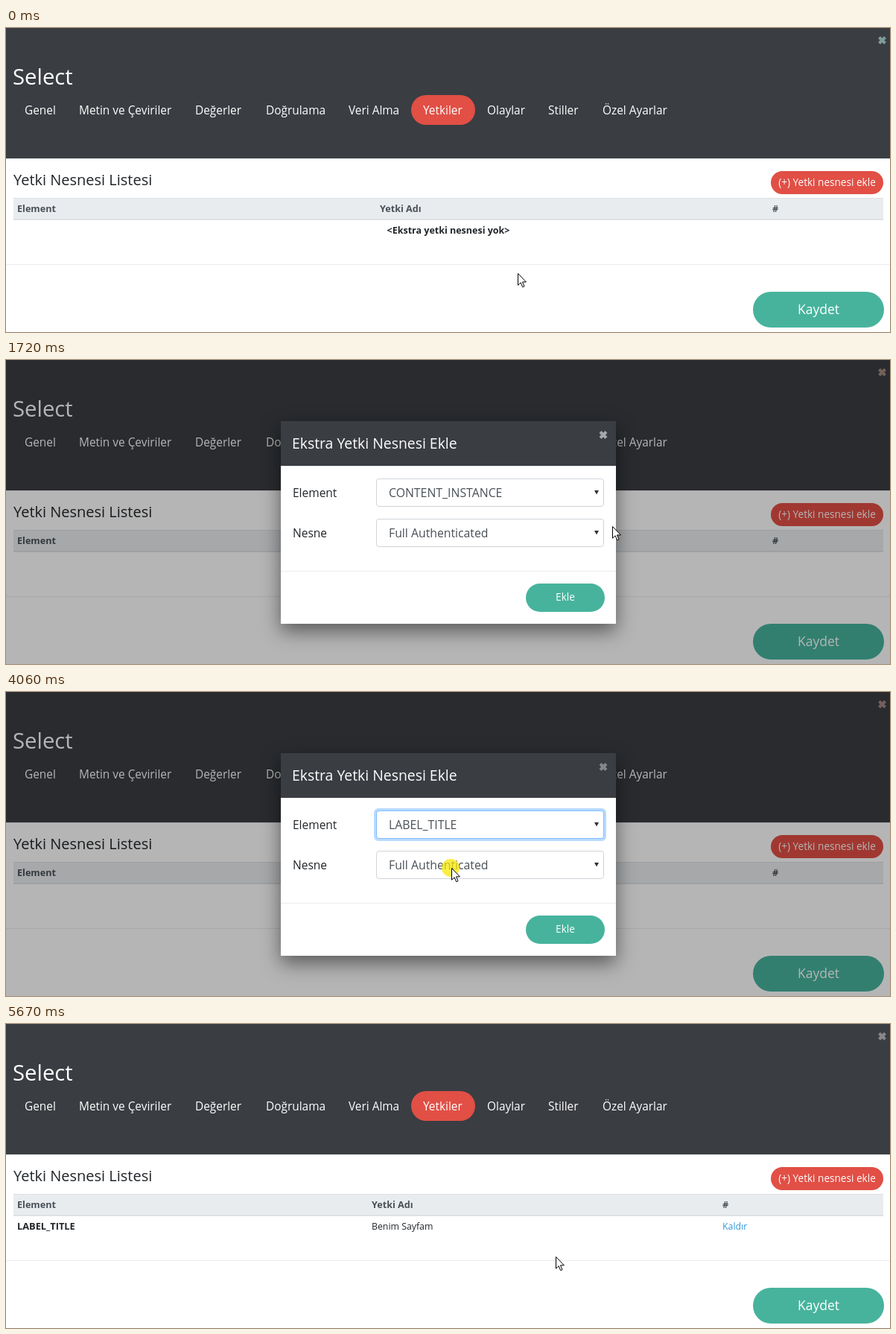
An HTML page that plays this animation: 1187x408 px, repeating every 5800 ms.

```html
<!DOCTYPE html>
<html lang="tr">
<head>
<meta charset="utf-8">
<title>Yetki Nesnesi</title>
<style>
html, body { margin: 0; width: 100%; height: 100%; overflow: hidden; background: #fff; }
svg { display: block; width: 100%; height: 100%; font-family: "Open Sans", "Noto Sans", sans-serif; }
text { white-space: pre; }
#modal { filter: drop-shadow(0 10px 13px rgba(0, 0, 0, .5)); }
</style>
</head>
<body>
<svg id="stage" viewBox="0 0 1187 408" xmlns="http://www.w3.org/2000/svg"></svg>
<script>
const NS = 'http://www.w3.org/2000/svg';
const LOOP = 5800;
const DARK = '#3a3d42', RED = '#e14f45', BLUE = '#375aaf', GREEN = '#47b39d';
const INK = '#212529', GREY = '#495057', LINE = '#e9ecef';

function el(parent, tag, attrs = {}) {
  const node = document.createElementNS(NS, tag);
  for (const k in attrs) node.setAttribute(k, attrs[k]);
  return parent.appendChild(node);
}
const rect = (p, x, y, width, height, fill, more) => el(p, 'rect', { x, y, width, height, fill, ...more });
const group = p => el(p, 'g');
function label(p, str, x, y, size, fill, weight = 400, anchor = 'start') {
  const node = el(p, 'text', { x, y, 'font-size': size, fill, 'font-weight': weight, 'text-anchor': anchor });
  node.textContent = str;
  return node;
}
function cross(p, x, y, stroke) {
  return el(p, 'path', { d: `M${x - 4} ${y - 4}l8 8m0 -8l-8 8`, stroke, 'stroke-width': 4 });
}
function pill(p, x, y, w, h, fill, str, base, size, weight) {
  const body = rect(p, x, y, w, h, fill, { rx: h / 2 });
  label(p, str, x + w / 2, base, size, '#fff', weight, 'middle');
  return body;
}
const show = (node, on) => node.setAttribute('display', on ? 'inline' : 'none');

const stage = document.getElementById('stage');

// Page
rect(stage, 0, 0, 1187, 408, '#fff');
rect(stage, 0, 0, 1187, 175, DARK);
rect(stage, 0, 175, 1187, 1, LINE);
const pageClose = cross(stage, 1176.5, 16.5, '#888');
label(stage, 'Select', 9, 76, 29.3, '#fff');
rect(stage, 544, 90, 86, 40, RED, { rx: 20 });
[['Genel', 25], ['Metin ve Çeviriler', 98], ['Değerler', 254], ['Doğrulama', 349], ['Veri Alma', 460],
 ['Yetkiler', 560], ['Olaylar', 646], ['Stiller', 728], ['Özel Ayarlar', 801]]
  .forEach(([name, x]) => label(stage, name, x, 116, 15.4, '#fff'));
label(stage, 'Yetki Nesnesi Listesi', 10, 211, 20, INK, 500);
const addButton = pill(stage, 1027, 192, 151, 31, RED, '(+) Yetki nesnesi ekle', 212, 13.6, 500);
rect(stage, 10, 228, 1168, 29, LINE);
rect(stage, 10, 228, 1168, 1, '#dee2e6');
rect(stage, 10, 256, 1168, 2, '#dee2e6');
label(stage, 'Element', 15, 247, 12.6, GREY, 700);

const emptyTable = group(stage), filledTable = group(stage);
label(emptyTable, 'Yetki Adı', 502, 247, 12.6, GREY, 700);
label(emptyTable, '#', 1029, 247, 12.6, GREY, 700);
label(emptyTable, '<Ekstra yetki nesnesi yok>', 594, 276, 12.5, INK, 700, 'middle');
label(filledTable, 'Yetki Adı', 491, 247, 12.6, GREY, 700);
label(filledTable, '#', 962, 247, 12.6, GREY, 700);
label(filledTable, 'LABEL_TITLE', 15, 276, 12.8, INK, 700);
label(filledTable, 'Benim Sayfam', 491, 276, 12.3, INK);
label(filledTable, 'Kaldır', 962, 276, 12.3, '#3498db');

rect(stage, 0, 317, 1187, 1, LINE);
pill(stage, 1003, 354, 176, 48, GREEN, 'Kaydet', 384, 17.5);
const backdrop = rect(stage, 0, 0, 1187, 408, '#000');

// Dialog
const modal = group(stage);
modal.id = 'modal';
rect(modal, 369, 82, 450, 272, '#fff');
rect(modal, 369, 82, 450, 60, DARK);
rect(modal, 369, 142, 450, 1, LINE);
const modalClose = cross(modal, 802, 100.5, '#aaa');
label(modal, 'Ekstra Yetki Nesnesi Ekle', 384, 119, 19.4, '#fff');
label(modal, 'Element', 385, 184, 15.5, INK);
label(modal, 'Nesne', 385, 238, 15.5, INK);
rect(modal, 369, 283, 450, 1, LINE);
pill(modal, 698, 300, 106, 38, GREEN, 'Ekle', 323, 13.7);

function selectBox(y) {
  const ring = rect(modal, 494, y - 3, 312, 44, '#b9dbff', { rx: 6 });
  const box = rect(modal, 497.5, y + .5, 305, 37, '#fff', { rx: 3.5 });
  const value = label(modal, '', 514, y + 25, 15.8, GREY);
  el(modal, 'path', { d: `M790 ${y + 16}h6l-3 5.5z`, fill: '#333' });
  return (str, focus) => {
    value.textContent = str;
    show(ring, focus);
    box.setAttribute('stroke', focus ? '#80bdff' : '#ced4da');
  };
}
const elementBox = selectBox(159), objectBox = selectBox(213);

function dropdown(y, h, items) {
  const PITCH = 20.2;
  const list = group(stage);
  rect(list, 497.5, y + .5, 305, h, '#fff', { stroke: '#5b8bd6' });
  const bar = rect(list, 498, y, 304, 20, '#1e90ff');
  const rows = items.map((s, i) => label(list, s, 514, y + 15.7 + i * PITCH, 15.8, GREY));
  return (open, active) => {
    show(list, open);
    bar.setAttribute('y', Math.round(y + 1 + active * PITCH));
    rows.forEach((row, i) => row.setAttribute('fill', i === active ? '#fff' : GREY));
  };
}
const elementList = dropdown(197, 62, ['CONTENT_INSTANCE', 'LABEL_TITLE', 'CHOSEN_ELEMENT']);
const objectList = dropdown(251, 180, ['Full Authenticated', 'Benim Sayfam', 'İşlerim', 'Birimim',
  'Bildirim Arama', 'ChangeManagement', 'DÖF Admin', 'DÖFBirimYönetici']);

// Pointer
const pointer = group(stage);
const halo = el(pointer, 'circle', { cx: -1, cy: 0, r: 12, fill: '#f8e800', opacity: .72 });
el(pointer, 'path', { d: 'M.5 .5V16.2L4.1 12.8L6.7 18.7L9 17.7L6.5 11.9H11.4Z', fill: '#fff', stroke: '#000', 'stroke-width': 1 });

const path = [
  [0, 687, 329], [100, 704, 325], [300, 850, 284], [500, 1030, 222], [600, 1067, 206], [700, 1073, 194],
  [1220, 1073, 194], [1320, 1062, 198], [1520, 950, 219], [1720, 814, 223], [1820, 751, 204],
  [2020, 672, 194], [2420, 618, 191], [2520, 608, 180], [2720, 600, 169], [3040, 600, 169],
  [3340, 600, 221], [3660, 600, 224], [3960, 598, 236], [4280, 598, 236], [4680, 593, 275],
  [4900, 593, 275], [5200, 715, 314], [5300, 738, 317], [5400, 738, 312], [LOOP, 738, 312]
];
const clicks = [[900, 1000], [2720, 2820], [3440, 3540], [4060, 4160], [4780, 4880], [5400, 5500]];

function pointerAt(t) {
  const i = Math.max(1, path.findIndex(p => p[0] >= t));
  const [t0, x0, y0] = path[i - 1], [t1, x1, y1] = path[i];
  const k = (t - t0) / (t1 - t0);
  return [Math.round(x0 + (x1 - x0) * k), Math.round(y0 + (y1 - y0) * k)];
}

const marks = [0, 1120, 3040, 3660, 4280, 4900, 5520, 5670];
function tick(t) {
  const mark = marks.filter(m => m <= t).pop();
  return mark + Math.floor((t - mark) / 100) * 100;
}

function draw(time) {
  const t = tick(time);
  const within = (a, b) => t >= a && t < b;
  const done = t >= 5620;
  const [x, y] = pointerAt(t);

  pointer.setAttribute('transform', `translate(${x} ${y})`);
  show(halo, clicks.some(([a, b]) => within(a, b)));
  addButton.setAttribute('fill', within(700, 1320) ? BLUE : RED);
  pageClose.setAttribute('stroke', t < 1000 ? '#7e9c97' : within(1220, 5620) ? '#a08880' : '#888');
  modalClose.setAttribute('stroke', t < 2520 ? '#a6a9ab' : '#85888b');

  show(emptyTable, !done);
  show(filledTable, done);
  show(modal, within(1100, 5620));
  backdrop.setAttribute('opacity', t < 1100 || t >= 5670 ? 0 : t < 1220 || done ? .08 : .29);

  elementBox(t < 3540 ? 'CONTENT_INSTANCE' : 'LABEL_TITLE', within(2820, 4160));
  objectBox(t < 4880 ? 'Full Authenticated' : 'Benim Sayfam', within(4160, 5400));
  elementList(within(2820, 3540), y < 218 ? 0 : 1);
  objectList(within(4160, 4880), y < 272 ? 0 : 1);
}

const start = performance.now();
function loop() {
  draw((performance.now() - start) % LOOP);
  requestAnimationFrame(loop);
}
loop();
</script>
</body>
</html>
```
